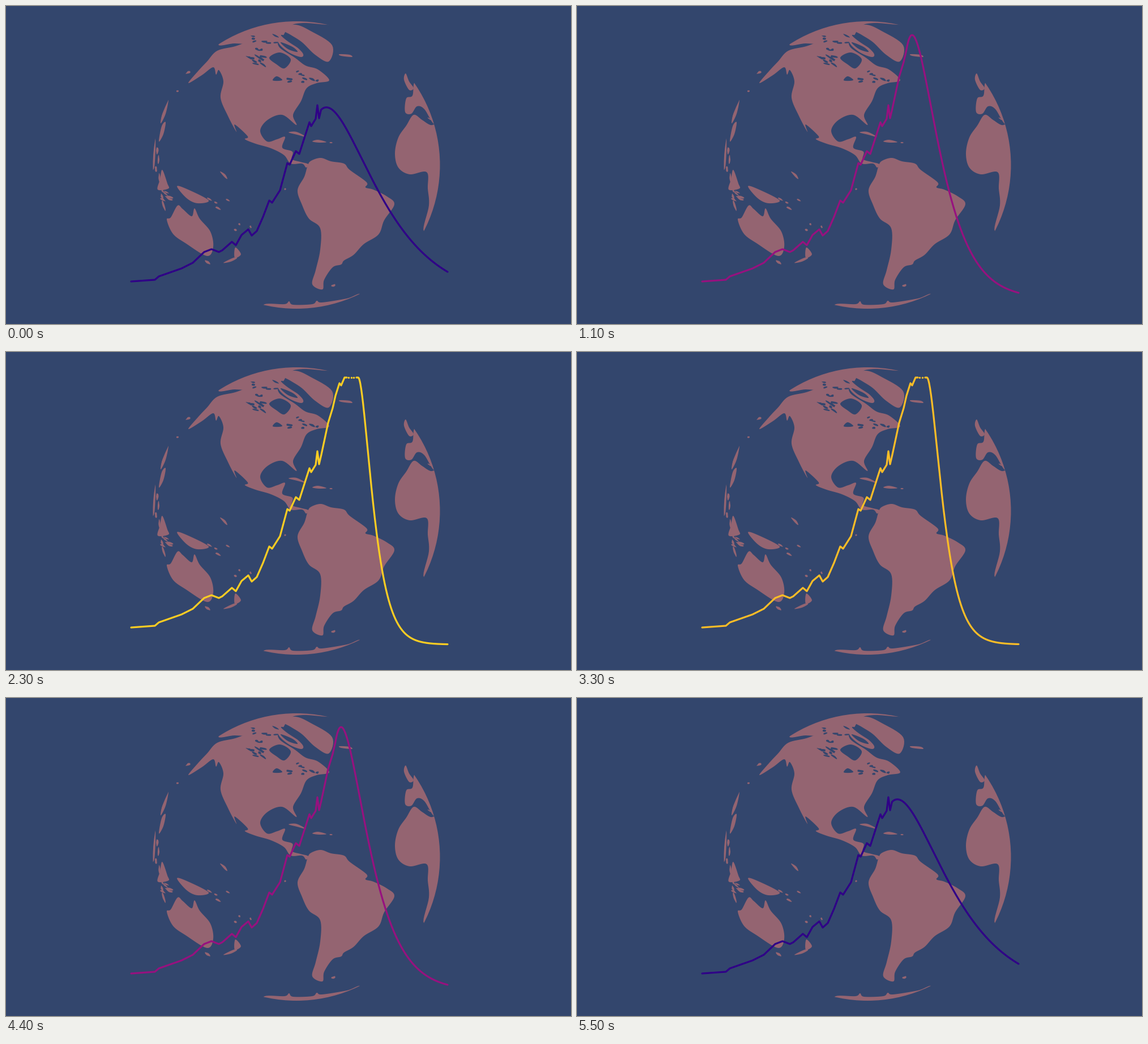
These frames come from a looping animation (998x561 px, 7.5 s). A matplotlib script:

```python
import random

import matplotlib.pyplot as plt
import numpy as np
from matplotlib.animation import FuncAnimation
from matplotlib.patches import Circle, Polygon

W, H, DPI = 998, 561, 128
PX = 72 / DPI
SEA, LAND = "#33466d", "#946471"
CX, CY, R = 513, 280.5, 253.5

fig = plt.figure(figsize=(W / DPI, H / DPI), dpi=DPI, facecolor=SEA)
ax = fig.add_axes([0, 0, 1, 1])
ax.set_xlim(0, W)
ax.set_ylim(H, 0)
ax.axis("off")

globe = Circle((CX, CY), R, fc="none", ec="none")
ax.add_patch(globe)
rng = random.Random(4)


def smooth(points, n=8):
    """Closed Catmull-Rom curve through the points."""
    p1 = np.array(points, float)[:, None, :]
    p0, p2, p3 = (np.roll(p1, k, axis=0) for k in (1, -1, -2))
    t = np.linspace(0, 1, n, endpoint=False)[None, :, None]
    curve = 2 * p1 + (p2 - p0) * t + (2 * p0 - 5 * p1 + 4 * p2 - p3) * t**2
    curve = curve + (3 * p1 - p0 - 3 * p2 + p3) * t**3
    return curve.reshape(-1, 2) / 2


def shape(*points, color=LAND):
    patch = Polygon(smooth(points), fc=color, ec="none")
    ax.add_patch(patch)
    patch.set_clip_path(globe)


def blob(x, y, w, h, angle=0, color=LAND):
    """Small uneven island or lake."""
    a = np.linspace(0, 2 * np.pi, 9)[:-1]
    r = np.array([rng.uniform(0.75, 1.2) for _ in a])
    u, v = w / 2 * r * np.cos(a), h / 2 * r * np.sin(a)
    c, s = np.cos(np.radians(angle)), np.sin(np.radians(angle))
    shape(*zip(x + u * c - v * s, y + u * s + v * c), color=color)


def scatter(count, xs, ys, length, tilt, color=LAND):
    """Seeded blobs spread over a box."""
    for _ in range(count):
        w = rng.uniform(*length)
        blob(rng.uniform(*xs), rng.uniform(*ys), w, rng.uniform(2.5, 4),
             rng.uniform(*tilt), color)


def island_arc(count, start, stop):
    """Islands flattened against the left rim, angles in degrees."""
    for a in np.linspace(start, stop, count):
        depth = R - rng.uniform(3, 14)
        rad = np.radians(a)
        blob(CX + depth * np.cos(rad), CY + depth * np.sin(rad),
             rng.uniform(8, 20), rng.uniform(3, 4.5), a + 90)


def draw_north_america():
    # Pacific coast down to the isthmus, then back up the Atlantic side.
    shape(
        (428, 62), (405, 71), (373, 79), (355, 98), (340, 114), (322, 136),
        (346, 122), (366, 108), (371, 121), (376, 113), (384, 133),
        (379, 162), (392, 194), (407, 222), (404, 209), (427, 230),
        (422, 235), (441, 243), (468, 251), (491, 263), (503, 278),
        (523, 278), (530, 285), (534, 279), (520, 275), (505, 270),
        (506, 257), (488, 250), (493, 231), (479, 235), (461, 239),
        (449, 220), (462, 201), (488, 192), (513, 210), (507, 192),
        (521, 168), (531, 145), (549, 136), (571, 131), (551, 112),
        (529, 105), (510, 91), (484, 74), (476, 58), (455, 50))


def draw_arctic():
    shape((376, 66), (440, 15), (510, 20), (573, 24), (573, 33), (525, 30),
          (500, 37), (480, 66), (452, 74), (428, 68), (404, 66))
    shape((486, 40), (511, 33), (538, 44), (576, 69), (570, 98), (546, 86),
          (523, 64), (503, 51))
    shape((484, 52), (505, 65), (524, 83), (521, 90), (500, 82), (482, 66))
    # Straits, the great bay and scattered waters.
    shape((485, 64), (506, 72), (515, 81), (498, 76), color=SEA)
    shape((486, 51), (508, 58), (530, 82), (516, 74), (496, 61), color=SEA)
    shape((465, 91), (484, 82), (503, 94), (492, 110), (478, 103), color=SEA)
    shape((471, 131), (478, 124), (488, 130), (482, 132), color=SEA)
    scatter(10, (434, 478), (52, 78), (6, 14), (-25, 30), SEA)
    scatter(9, (428, 462), (88, 106), (7, 15), (0, 40), SEA)
    scatter(9, (470, 556), (112, 134), (4, 12), (-20, 25), SEA)
    shape((589, 85), (607, 86), (611, 90), (592, 88))


def draw_south_america():
    shape(
        (533, 281), (527, 301), (515, 325), (523, 351), (535, 375),
        (555, 392), (555, 430), (547, 466), (541, 491), (559, 500),
        (562, 483), (577, 461), (592, 456), (597, 449), (614, 439),
        (632, 420), (658, 403), (668, 378), (686, 350), (673, 336),
        (649, 324), (635, 320), (637, 311), (607, 289), (597, 278),
        (574, 274), (556, 268), (539, 273))
    shape((499, 223), (513, 222), (530, 231), (514, 227))
    shape((541, 239), (551, 236), (566, 240), (553, 241))
    blob(574, 241, 5, 2)
    blob(493, 323, 4, 3)
    blob(578, 493, 8, 4, -15)


def draw_east():
    shape(
        (720, 192), (707, 211), (693, 232), (687, 260), (693, 285),
        (713, 297), (743, 293), (745, 322), (747, 352), (738, 397),
        (770, 380), (790, 280), (770, 212), (750, 210), (735, 201))
    shape((723, 133), (718, 158), (707, 163), (705, 187), (716, 190),
          (726, 177), (739, 182), (757, 209), (775, 200), (750, 140))
    shape((706, 119), (712, 133), (720, 145), (712, 148), (703, 130))
    blob(748, 199, 7, 2, 30)


def draw_west_pacific():
    shape(
        (303, 352), (291, 373), (284, 377), (295, 402), (318, 419),
        (355, 441), (366, 425), (361, 398), (342, 375), (333, 357),
        (328, 371), (312, 358))
    shape((302, 318), (322, 324), (358, 343), (338, 348), (319, 339))
    shape((405, 426), (415, 438), (404, 444))
    shape((384, 453), (402, 444), (408, 445), (397, 451))
    shape((378, 292), (387, 297), (391, 305), (386, 302))
    shape((287, 164), (282, 190), (273, 207), (278, 181))
    shape((282, 205), (278, 226), (270, 239), (275, 212))
    shape((264, 235), (262, 284), (255, 284), (258, 238))
    shape((276, 289), (285, 313), (287, 322), (268, 324), (272, 306))
    island_arc(7, 163, 186)
    scatter(6, (266, 300), (328, 342), (7, 13), (20, 45))
    scatter(4, (358, 392), (338, 357), (6, 12), (25, 40))
    scatter(3, (402, 458), (380, 398), (4, 6), (30, 70))
    blob(321, 117, 11, 5, -10)
    blob(303, 150, 5, 3)
    blob(356, 452, 10, 4, 40)


def draw_south_pole():
    shape((457, 526), (492, 526), (500, 521), (507, 527), (541, 526),
          (549, 520), (558, 523), (602, 516), (626, 509), (610, 545),
          (515, 555), (455, 540))


draw_north_america()
draw_arctic()
draw_south_america()
draw_east()
draw_west_pacific()
draw_south_pole()

past = np.array([
    (221, 486), (263, 483), (270, 477), (310, 463), (330, 453), (350, 434),
    (363, 429), (376, 434), (382, 431), (399, 416), (406, 422), (416, 404),
    (428, 394), (434, 405), (443, 397), (454, 372), (465, 343), (470, 347),
    (484, 325), (497, 277), (501, 280), (512, 256), (518, 261), (536, 205),
    (539, 212), (547, 199), (550, 175), (553, 198), (557, 181), (569, 125),
    (577, 99), (582, 77), (589, 55), (592, 59), (598, 45), (640, 45)])
BASE, TOP, FLAT, END = 516, 45, 603, 780

STOPS = [0, 11, 17, 23]
COLORS = np.array([(47, 0, 135), (151, 17, 127), (245, 111, 60),
                   (252, 205, 35)]) / 255

line, = ax.plot([], [], lw=3.2 * PX, solid_capstyle="round",
                solid_joinstyle="round")
dots, = ax.plot([], [], "o", ms=3.4 * PX, mew=0)


def curve(step):
    """History up to the turning point, then a decay on a fixed budget."""
    x0 = np.interp(step, STOPS, [556.5, 582, 598, 622])
    rate = np.interp(step, STOPS, [0.0162, 0.0305, 0.0375, 0.06])
    growth = np.interp(step, [0, 11, 17, 18], [0.18, 0.43, 0.2, 0])
    y0 = np.interp(x0, *past.T)
    x = np.linspace(x0, END, 200)
    u = rate * (x - x0)
    y = BASE - (BASE - y0) * (1 + (1 + growth) * u) * np.exp(-u)

    before = past[past[:, 0] < min(x0, FLAT)]
    resume = x0 - 4
    lead = []
    if resume > FLAT:
        lead = [(FLAT - 1, TOP), (np.nan, np.nan), (resume + 1, TOP)]
    points = np.vstack([before, *lead, np.column_stack([x, y])])
    return points, np.arange(FLAT + 2.5, resume, 4.3)


def update(tick):
    """Advance, hold at the last step, return, hold at the first."""
    step = min(tick, STOPS[-1]) if tick < 33 else max(55 - tick, 0)
    points, gaps = curve(step)
    color = [np.interp(step, STOPS, channel) for channel in COLORS.T]
    line.set_data(*points.T)
    dots.set_data(gaps, np.full(len(gaps), TOP))
    line.set_color(color)
    dots.set_color(color)
    return line, dots


anim = FuncAnimation(fig, update, frames=75, interval=100, repeat=True,
                     repeat_delay=0, blit=False)
plt.show()
```
